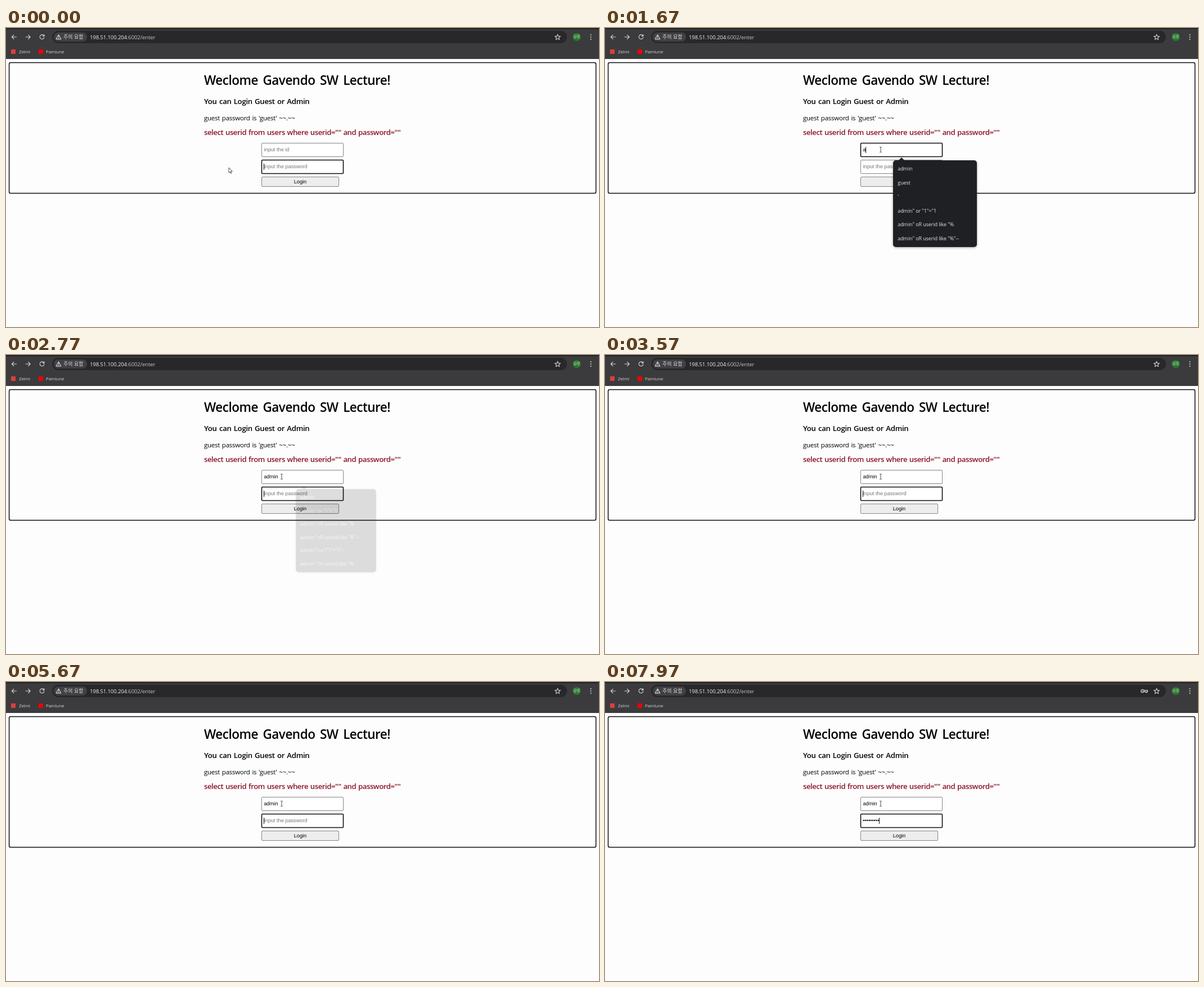
Write an HTML page that moves like this. It is 1054 by 531 pixels and loops after 8000 ms.

```html
<!DOCTYPE html>
<html lang="ko">
<head>
<meta charset="utf-8">
<title>Login page</title>
<style>
  html, body { margin: 0; width: 100%; height: 100%; overflow: hidden; background: #fdfdfd; }
  svg { display: block; width: 1054px; height: 531px; }
  text { font-family: "Open Sans", "Noto Sans", sans-serif; white-space: pre; }
  .line { fill: none; stroke: #d6d6d8; stroke-width: 1.1; stroke-linecap: round; stroke-linejoin: round; }
  .mark { font-size: 8px; letter-spacing: -.1px; fill: #d2d2d4; }
  .url { font-size: 9.6px; letter-spacing: -.15px; fill: #c3c3c6; }
  .ko { font-family: "Noto Sans CJK KR", "Noto Sans CJK", sans-serif; }
  .title { font-size: 22.5px; font-weight: 600; letter-spacing: -.5px; word-spacing: 3.2px; }
  .sub { font-size: 13.2px; font-weight: 600; letter-spacing: -.3px; word-spacing: 1.1px; }
  .sql { letter-spacing: -.45px; word-spacing: .7px; fill: #8b1626; }
  .para { font-size: 11.5px; letter-spacing: -.25px; word-spacing: 1px; }
  .form text { font-family: "Liberation Sans", Arial, sans-serif; font-size: 9.2px; }
  .form rect { fill: #fff; stroke: #858585; stroke-width: 1; }
  .form rect.focus { stroke: #101010; stroke-width: 1.6; }
  .form text.hint { fill: #757575; }
  #popup { filter: drop-shadow(0 1px 2px rgba(0, 0, 0, .35)); }
  #popup text { font-size: 9px; letter-spacing: -.1px; fill: #e3e3e3; }
</style>
</head>
<body>
<svg viewBox="0 0 1054 531">
  <rect width="1054" height="531" fill="#fdfdfd"/>

  <!-- browser bar -->
  <rect width="1054" height="55" fill="#3b3b3e"/>
  <rect width="1054" height="2" fill="#202123"/>
  <rect x="82" y="5" width="915" height="22" rx="11" fill="#28282b"/>
  <g class="line">
    <path d="M18.5 16H10.5M14 12.3L10.3 16L14 19.7"/>
    <path d="M35 16H43M39.5 12.3L43.2 16L39.5 19.7"/>
    <path d="M67 13.2A3.9 3.9 0 1 0 67.9 16.6M68 11.7V14.4H65.2"/>
  </g>
  <rect x="85" y="8" width="59" height="16" rx="8" fill="#414145"/>
  <path class="line" d="M93.5 12L97.8 19.6H89.2ZM93.5 14.8V16.6M93.5 18V18.1"/>
  <text class="ko" x="102" y="19" font-size="9" fill="#dededf">주의 요함</text>
  <text class="url" x="149" y="19.5"><tspan fill="#ececee">198.51.100.204</tspan>:6002/enter</text>
  <g id="key" class="line">
    <circle cx="955.4" cy="16" r="2.7"/>
    <path d="M958 14.9H964.5V17.1H963.3V18.6H961.2V17.1H958"/>
    <circle cx="955.4" cy="16" r=".4"/>
  </g>
  <path class="line" id="star"/>
  <circle cx="1014.5" cy="16" r="7" fill="#2b7a2f"/>
  <text class="ko" x="1014.5" y="18.4" font-size="6.5" fill="#dcebdc" text-anchor="middle">모루</text>
  <g fill="#d6d6d8">
    <circle cx="1039.5" cy="12" r="1.1"/><circle cx="1039.5" cy="16" r="1.1"/><circle cx="1039.5" cy="20" r="1.1"/>
  </g>
  <rect x="9" y="38" width="8" height="8" fill="#d9403a"/>
  <text class="mark" x="23" y="44.6">Zelmi</text>
  <rect x="58" y="38" width="8" height="8" fill="#f00000"/>
  <text class="mark" x="71" y="44.6">Pamlune</text>

  <!-- page -->
  <rect x="5.6" y="61.6" width="1043" height="232" rx="2.5" fill="none" stroke="#0c0c0c" stroke-width="1.5"/>
  <text class="title" x="352" y="101">Weclome Gavendo SW Lecture!</text>
  <text class="sub" x="352" y="135.3">You can Login Guest or Admin</text>
  <text class="para" x="352" y="163.5">guest password is 'guest' ~~.~~</text>
  <text class="sub sql" x="352" y="190">select userid from users where userid="" and password=""</text>
  <g class="form">
    <rect id="idBox" x="454.5" y="204.5" width="145" height="24" rx="1.5"/>
    <text id="idText" x="458.5" y="219.4"></text>
    <rect id="pwBox" x="454.5" y="234.5" width="145" height="24" rx="1.5"/>
    <text id="pwText" x="458.5" y="249.4"></text>
    <rect x="454.5" y="264.5" width="137" height="17" rx="1.5" style="fill:#ededed"/>
    <text x="523" y="276.4" text-anchor="middle">Login</text>
  </g>
  <rect id="caret" width="1" height="11" fill="#111"/>

  <g id="popup">
    <path d="M521.5 235.5L527 230L532.5 235.5Z" fill="#1f2023"/>
    <rect x="512" y="235" width="149" height="154" rx="5" fill="#1f2023"/>
    <g id="items"></g>
  </g>

  <path id="arrow" d="M0 0V9.2L2.1 7.3L3.5 10.3L4.9 9.7L3.5 6.7H6.3Z" fill="#fff" stroke="#222" stroke-width=".8"/>
  <path id="beam" d="M-1.8 -4.5H-.5L0 -4L.5 -4.5H1.8M0 -4V4M-1.8 4.5H-.5L0 4L.5 4.5H1.8" fill="none" stroke="#333" stroke-width=".9"/>
</svg>

<script>
const LOOP = 8000;
const $ = id => document.getElementById(id);
const show = (el, on) => el.setAttribute('visibility', on ? 'visible' : 'hidden');
const clamp = v => Math.min(1, Math.max(0, v));
const ease = p => p * p * (3 - 2 * p);
const place = (el, x, y) => el.setAttribute('transform', `translate(${x} ${y})`);

const MOVE = { start: 250, end: 800, from: [396, 248], to: [490, 216] };
const ID_FOCUS = 1000, PW_FOCUS = 2560;
const POPUP = { open: 1060, filter: 1720, close: 2600 };
const ID_KEYS = [1640, 1850, 2040, 2220, 2400];
const PW_KEYS = [6060, 6310, 6550, 6810, 7010, 7220, 7430, 7650, 7880];

const LIKE = 'admin" oR userid like "%';
const ALL = ['admin', 'guest', "'", 'admin" or "1"="1', LIKE, LIKE + '"--'];
const MATCHES = ['admin', ALL[3], LIKE, LIKE + '"--', 'admin") or ("1"="1"--', 'admin" Or userid like "%'];

const rows = ALL.map((_, i) => {
  const row = document.createElementNS('http://www.w3.org/2000/svg', 'text');
  row.setAttribute('x', 520.3);
  row.setAttribute('y', 253.4 + i * 24.7);
  return $('items').appendChild(row);
});

const starPoints = Array.from({ length: 10 }, (_, i) => {
  const r = i % 2 ? 2.2 : 5.2, a = i * Math.PI / 5;
  return `${(980.5 + r * Math.sin(a)).toFixed(2)} ${(16.4 - r * Math.cos(a)).toFixed(2)}`;
});
$('star').setAttribute('d', 'M' + starPoints.join('L') + 'Z');

function fillField(name, value, hint, focused) {
  const text = $(name + 'Text');
  text.textContent = value || hint;
  text.setAttribute('class', value ? '' : 'hint');
  $(name + 'Box').setAttribute('class', focused ? 'focus' : '');
}

function drawPopup(t) {
  const closing = clamp((t - POPUP.close) / 200);
  const level = clamp((t - POPUP.open) / 150) * (1 - closing);
  const scale = 0.95 + 0.05 * level;
  const popup = $('popup');
  show(popup, level > 0);
  popup.setAttribute('opacity', level);
  popup.setAttribute('transform', `translate(586.5 312) scale(${scale}) translate(-586.5 -312)`);
  const list = t < POPUP.filter ? ALL : MATCHES;
  rows.forEach((row, i) => row.textContent = list[i]);
}

function drawCaret(t, inId, typed) {
  const keys = inId ? ID_KEYS : PW_KEYS;
  const focusTime = inId ? ID_FOCUS : t < ID_FOCUS ? 0 : PW_FOCUS;
  const since = typed ? keys[typed - 1] : focusTime;
  const width = typed ? $(inId ? 'idText' : 'pwText').getComputedTextLength() : 0;
  $('caret').setAttribute('x', 458 + width);
  $('caret').setAttribute('y', inId ? 211 : 241);
  show($('caret'), (t - since) % 1000 < 500);
}

function drawMouse(t) {
  const p = ease(clamp((t - MOVE.start) / (MOVE.end - MOVE.start)));
  const [x, y] = MOVE.from.map((v, i) => v + (MOVE.to[i] - v) * p);
  const overField = x > 454 && y < 229;
  place($('arrow'), x, y);
  place($('beam'), x, y);
  show($('arrow'), !overField);
  show($('beam'), overField);
}

function render(t) {
  const inId = t >= ID_FOCUS && t < PW_FOCUS;
  const idCount = ID_KEYS.filter(k => k <= t).length;
  const pwCount = PW_KEYS.filter(k => k <= t).length;
  fillField('id', 'admin'.slice(0, idCount), 'input the id', inId);
  fillField('pw', '•'.repeat(pwCount), 'input the password', !inId);
  drawCaret(t, inId, inId ? idCount : pwCount);
  show($('key'), pwCount > 0);
  drawPopup(t);
  drawMouse(t);
}

const began = performance.now();
function tick() {
  render((performance.now() - began) % LOOP);
  requestAnimationFrame(tick);
}
tick();
</script>
</body>
</html>
```
